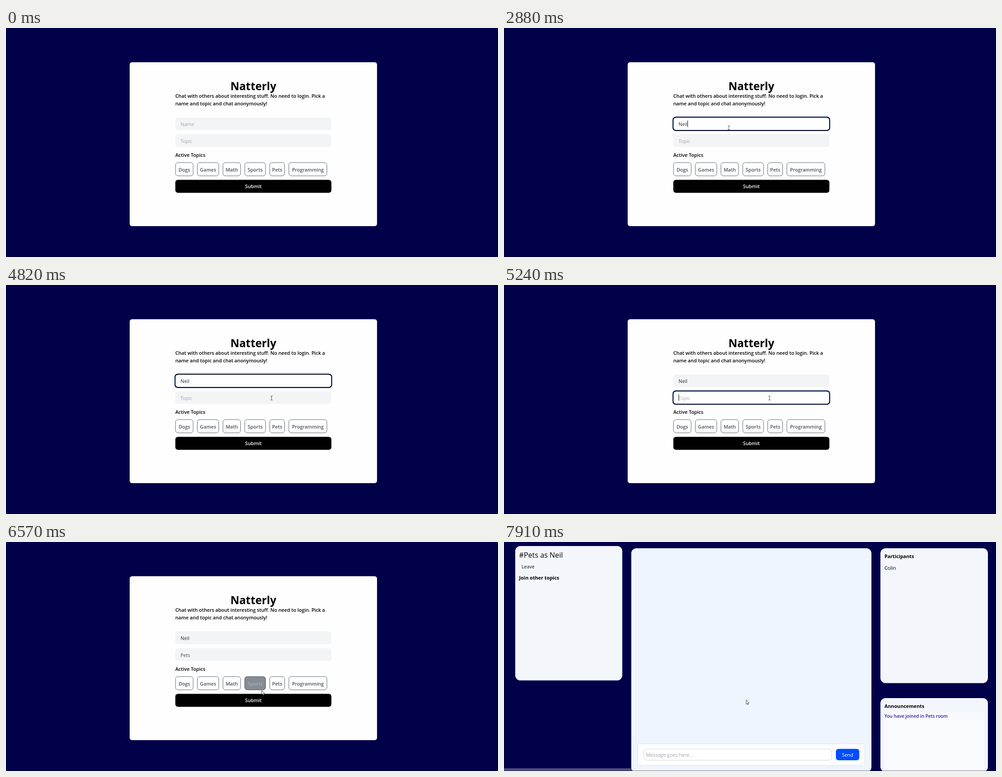
An HTML page with a canvas that plays this animation: 1094 by 512 pixels, repeating every 8000 ms.

```html
<!DOCTYPE html>
<html lang="en">
<head>
<meta charset="utf-8">
<title>Chat room sign-in</title>
<style>
  html, body { margin: 0; width: 100%; height: 100%; overflow: hidden; background: #01014a; }
  canvas { display: block; }
</style>
</head>
<body>
<canvas id="stage" width="1094" height="512"></canvas>
<script>
const ctx = document.getElementById('stage').getContext('2d');
const LOOP = 8000;
const FONT = '"Open Sans", "Noto Sans", sans-serif';
const USER = 'Neil';
const NAVY = '#01014a';
const SLATE = [31, 41, 55];

const nameBox = { x: 376.5, y: 200, w: 347, h: 28.5 };
const topicBox = { x: 376.5, y: 237.5, w: 347, h: 28.5 };
const submitBox = { x: 376.5, y: 339.5, w: 347, h: 29 };
const tags = [
  ['Dogs', 376.5, 416.5], ['Games', 425, 473.5], ['Math', 482, 522],
  ['Sports', 530.5, 577.5], ['Pets', 586, 620], ['Programming', 628.5, 714]
].map(([label, x, right]) => ({ label, x, y: 300.5, w: right - x, h: 30.5 }));

// Pointer path: time, x, y
const path = [
  [70, 1030, 503], [300, 835, 390], [450, 738, 338], [560, 650, 320],
  [690, 540, 311], [780, 505, 298], [850, 499, 246], [920, 499, 246],
  [1150, 500, 223], [3660, 500, 223], [3900, 545, 262], [4150, 600, 319],
  [4430, 597, 310], [4500, 595, 300], [4820, 590.5, 252.5], [5320, 590.5, 252.5],
  [5700, 597, 308], [6260, 597, 308], [6600, 566, 334], [6890, 538.5, 353]
];
const clicks = [1320, 4900, 5740, 7350];
const keys = [2330, 2590, 2800, 2880];
const focusName = 1400, focusTopic = 4910, pickTopic = 5790;
const openChat = 7680, joined = 7830;

const clamp = v => Math.max(0, Math.min(1, v));
const ramp = (t, start, span) => clamp((t - start) / span);
const mix = (a, b, k) => `rgb(${a.map((v, i) => Math.round(v + (b[i] - v) * k))})`;
const inside = (p, b) => p && p.x >= b.x && p.x <= b.x + b.w && p.y >= b.y && p.y <= b.y + b.h;

function pointerAt(t) {
  if (t < path[0][0]) return null;
  const i = path.findIndex(p => p[0] > t);
  if (i < 0) return { x: 538.5, y: 353 };
  const [t0, x0, y0] = path[i - 1], [t1, x1, y1] = path[i];
  const k = (t - t0) / (t1 - t0);
  return { x: x0 + (x1 - x0) * k, y: y0 + (y1 - y0) * k };
}

// Share of the last 150 ms that the pointer spent on a box
function hover(box, t) {
  let n = 0;
  for (let i = 0; i < 15; i++) n += inside(pointerAt(t - i * 10), box) ? 1 : 0;
  return n / 15;
}

function box(x, y, w, h, r, fill, stroke, line = 0.8) {
  ctx.beginPath();
  ctx.roundRect(x, y, w, h, r);
  if (fill) { ctx.fillStyle = fill; ctx.fill(); }
  if (stroke) { ctx.strokeStyle = stroke; ctx.lineWidth = line; ctx.stroke(); }
}

function text(str, x, y, size, weight, color, align = 'left') {
  ctx.font = `${weight} ${size}px ${FONT}`;
  ctx.textAlign = align;
  ctx.fillStyle = color;
  ctx.fillText(str, x, y);
  return ctx.measureText(str).width;
}

function field(b, focus, value, hint, color, caret) {
  const { x, y, w, h } = b;
  if (focus > 0) {
    const glow = 2.2 * focus, edge = 1.5 * focus;
    box(x - glow, y - glow, w + 2 * glow, h + 2 * glow, 7.5, `rgba(110,160,245,${0.75 * focus})`);
    box(x - edge, y - edge, w + 2 * edge, h + 2 * edge, 7, `rgba(0,0,20,${focus})`);
  }
  const inset = 0.4 * focus;
  box(x + inset, y + inset, w - 2 * inset, h - 2 * inset, 5.7,
    mix([243, 244, 246], [255, 255, 255], focus));
  const width = text(value || hint, 388, y + 19, 10.8, 400, value ? color : '#a1a6b0');
  if (caret) {
    ctx.fillStyle = '#111';
    ctx.fillRect(Math.round(388 + (value ? width : 0)), y + 6.5, 1, 15);
  }
}

const blink = (t, from) => Math.floor((t - from) / 530) % 2 === 0;

function drawForm(t) {
  box(275, 76.5, 550, 366.5, 5.5, '#fefefe');
  text('Natterly', 550, 139, 24.3, 700, '#000', 'center');
  text('Chat with others about interesting stuff. No need to login. Pick a', 376.5, 156, 10.77, 600, '#000');
  text('name and topic and chat anonymously!', 376.5, 173, 10.77, 600, '#000');

  const typed = keys.filter(k => t >= k).length;
  const nameFocus = ramp(t, focusName, 200) - ramp(t, focusTopic, 200);
  const topicFocus = ramp(t, focusTopic, 200) - ramp(t, pickTopic, 200);
  const lastKey = typed ? keys[typed - 1] : focusName - 60;
  field(nameBox, nameFocus, USER.slice(0, typed), 'Name', '#1f2937',
    t >= focusName && t < focusTopic && blink(t, lastKey));
  field(topicBox, topicFocus, t >= pickTopic ? 'Pets' : '', 'Topic', '#4b5057',
    t >= focusTopic && t < pickTopic && blink(t, focusTopic));

  text('Active Topics', 376.5, 288, 10.77, 600, '#000');
  for (const tag of tags) {
    const k = hover(tag, t);
    box(tag.x + 0.4, tag.y + 0.4, tag.w - 0.8, tag.h - 0.8, 5.5,
      mix([254, 254, 254], SLATE, k), mix([75, 85, 99], SLATE, k), 0.9);
    text(tag.label, tag.x + tag.w / 2, 320.7, 10.77, 600,
      mix([75, 80, 88], [255, 255, 255], k), 'center');
  }
  const { x, y, w, h } = submitBox;
  box(x, y, w, h, 5.7, mix([0, 0, 0], SLATE, hover(submitBox, t)));
  text('Submit', 550, 358.4, 10.77, 600, '#fff', 'center');
}

function drawChat(t) {
  const panel = '#f3f6fb';
  box(25, 9, 238, 300.5, 11.5, panel);
  text('#Pets as ' + USER, 33.5, 35.3, 16.2, 500, '#000');
  text('Leave', 39, 59, 10.8, 400, '#111');
  text('Join other topics', 33.5, 84, 10.9, 700, '#000');

  box(283, 14, 534, 501, 11.5, '#eef5fe');
  box(297.5, 451.2, 505, 48.2, 3, '#fff', '#d5dbe6');
  box(310.8, 462.8, 417.8, 25, 6, '#fff', '#c3cbd8');
  text('Message goes here...', 315.5, 480, 10.85, 400, '#9aa1ad');
  box(738, 462.5, 52, 25.5, 5.7, '#004dff');
  text('Send', 764, 479.7, 10.8, 500, '#fff', 'center');

  box(837, 14, 239, 301.5, 11.5, panel);
  text('Participants', 846, 36, 10.8, 700, '#000');
  box(837, 349, 239, 165, 11.5, panel);
  text('Announcements', 846, 371, 10.8, 700, '#000');
  box(846, 381, 221, 135, 0, '#f9fafe');
  if (t >= joined) {
    text('Colin', 846, 62, 10.9, 500, '#000');
    text('You have joined in Pets room', 846, 392.6, 10.05, 600, '#2c20a0');
  }
}

function drawStatus(t) {
  const alpha = ramp(t, 6790, 100) * (1 - 0.68 * ramp(t, joined - 80, 120));
  if (!alpha) return;
  ctx.globalAlpha = alpha;
  box(-4, 506, 369, 12, 2, '#f6efe2');
  text('localhost:3000/chat', 0, 516, 8, 400, '#666');
  ctx.globalAlpha = 1;
}

function shape(points, x, y) {
  ctx.beginPath();
  points.forEach(([dx, dy]) => ctx.lineTo(x + dx, y + dy));
  ctx.closePath();
  ctx.fillStyle = '#fff';
  ctx.fill();
  ctx.strokeStyle = '#222';
  ctx.lineWidth = 0.8;
  ctx.stroke();
}

const arrow = [[0, 0], [0, 9.6], [2.2, 7.6], [3.8, 11], [5.2, 10.3], [3.7, 7.1], [6.6, 7]];
const hand = [[-1, 0.3], [0, -0.3], [1, 0.4], [1.2, 4], [4.5, 4.6], [5.8, 5.8],
  [5.6, 9.5], [4.6, 12.5], [-0.2, 12.5], [-3.2, 8], [-2.6, 7], [-1, 8]];

function ibeam(x, y) {
  ctx.fillStyle = '#333';
  ctx.fillRect(x - 0.4, y - 4.5, 0.9, 9.5);
  for (const end of [-4.8, 4.2]) {
    ctx.fillRect(x - 2.5, y + end, 2, 0.8);
    ctx.fillRect(x + 0.6, y + end, 2, 0.8);
  }
}

function drawPointer(t) {
  const p = pointerAt(t);
  if (!p) return;
  const click = clicks.find(c => t >= c && t < c + 90);
  if (click) {
    ctx.beginPath();
    ctx.arc(p.x - 0.7, p.y - 0.5, 9, 0, Math.PI * 2);
    ctx.fillStyle = 'rgba(250,244,50,0.65)';
    ctx.fill();
  }
  const form = t < openChat;
  if (form && (inside(p, nameBox) || inside(p, topicBox))) ibeam(p.x, p.y);
  else if (form && tags.some(tag => inside(p, tag))) shape(hand, p.x, p.y);
  else shape(arrow, p.x, p.y);
}

function draw(t) {
  ctx.fillStyle = NAVY;
  ctx.fillRect(0, 0, 1094, 512);
  if (t < openChat) drawForm(t);
  else drawChat(t);
  drawStatus(t);
  ctx.fillStyle = 'rgba(0,0,30,0.55)';
  ctx.fillRect(0, 511, 1094, 1);
  drawPointer(t);
}

const start = performance.now();
function tick() {
  draw((performance.now() - start) % LOOP);
  requestAnimationFrame(tick);
}
tick();
</script>
</body>
</html>
```
